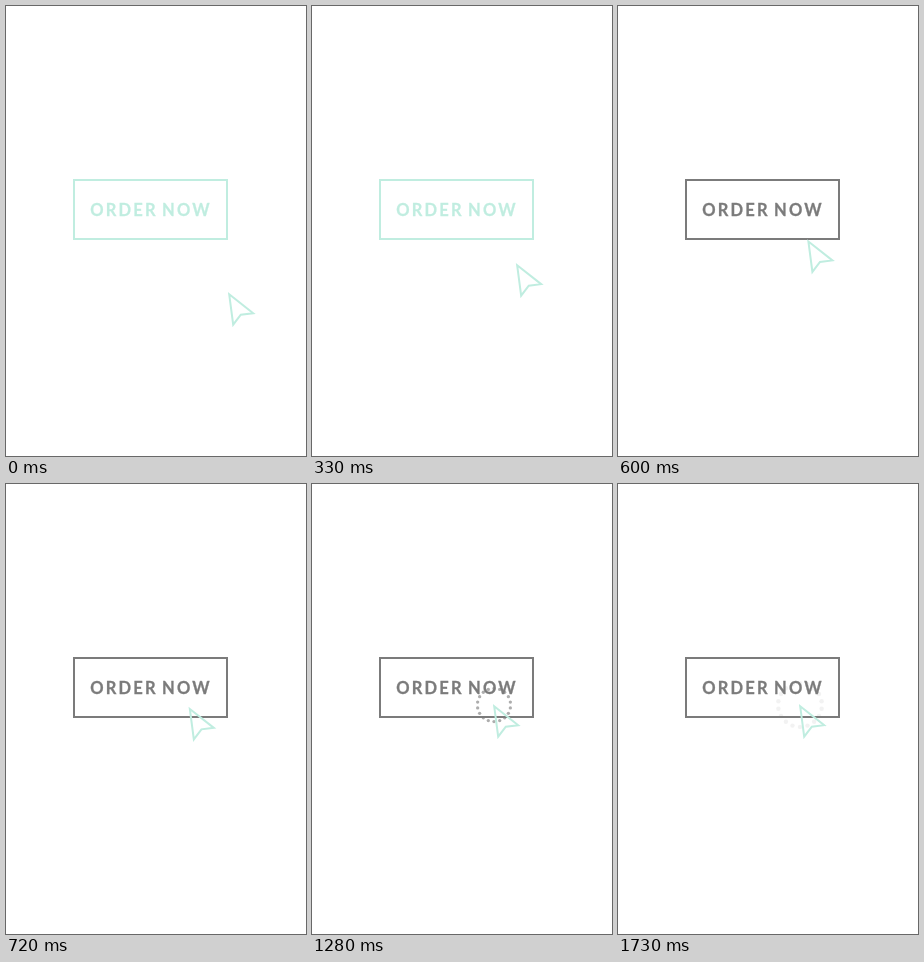
Write an HTML page that moves like this. It is 300 px wide and 450 px high and loops after 4.85 s.

```html
<!DOCTYPE html>
<html lang="en">
<head>
<meta charset="utf-8">
<title>Order button</title>
<style>
  html, body { margin: 0; width: 100%; height: 100%; overflow: hidden; background: #fff; }
  svg { display: block; width: 300px; height: 450px; }
  text {
    font: 700 16.5px Lato, Inter, sans-serif;
    letter-spacing: 2.2px;
    word-spacing: -2px;
    fill: currentColor;
    stroke: currentColor;
    stroke-width: .3px;
  }
</style>
</head>
<body>
<svg viewBox="0 0 300 450">
  <g id="button">
    <rect x="68" y="174" width="153" height="59" fill="none" stroke="currentColor" stroke-width="2"/>
    <text x="84.2" y="210">ORDER NOW</text>
  </g>
  <g id="ring" fill="#7b7b7b"></g>
  <path id="cursor" d="M0 0L24 18.9L11.6 20.4L4 30.4Z" fill="none" stroke="#c0ede0" stroke-width="2"/>
</svg>
<script>
const LOOP = 4850, STEP = 30, DOTS = 18;
const [button, ring, cursor] = ["button", "ring", "cursor"].map(id => document.getElementById(id));

for (let i = 0; i < DOTS; i++) {
  const dot = document.createElementNS("http://www.w3.org/2000/svg", "circle");
  const angle = i * 2 * Math.PI / DOTS;
  dot.setAttribute("cx", 17 * Math.sin(angle));
  dot.setAttribute("cy", 17 * Math.cos(angle));
  dot.setAttribute("r", 1.7);
  ring.append(dot);
}

// Linear ramp from a to b while t runs from t0 to t1, held outside.
function ramp(t, t0, t1, a, b) {
  const p = Math.min(1, Math.max(0, (t - t0) / (t1 - t0)));
  return a + (b - a) * p;
}

function draw(now) {
  const t = Math.floor(now % LOOP / STEP + 1e-6) * STEP;
  const x = ramp(t, 0, 750, 223.2, 182.2);
  const y = ramp(t, 0, 750, 288.3, 222.3);
  cursor.setAttribute("transform", `translate(${x} ${y})`);
  button.setAttribute("color", t < 570 ? "#c0ede0" : "#7b7b7b");

  const scale = ramp(t, 990, 1650, 0.76, 1.29);
  const fade = t < 1190 ? ramp(t, 990, 1190, 0.25, 0.7) : ramp(t, 1190, 1730, 0.7, 0.07);
  ring.setAttribute("transform", `translate(182 221) scale(${scale})`);
  ring.setAttribute("opacity", t < 990 ? 0 : fade);
}

function tick() {
  draw(performance.now());
  requestAnimationFrame(tick);
}
tick();
</script>
</body>
</html>
```
